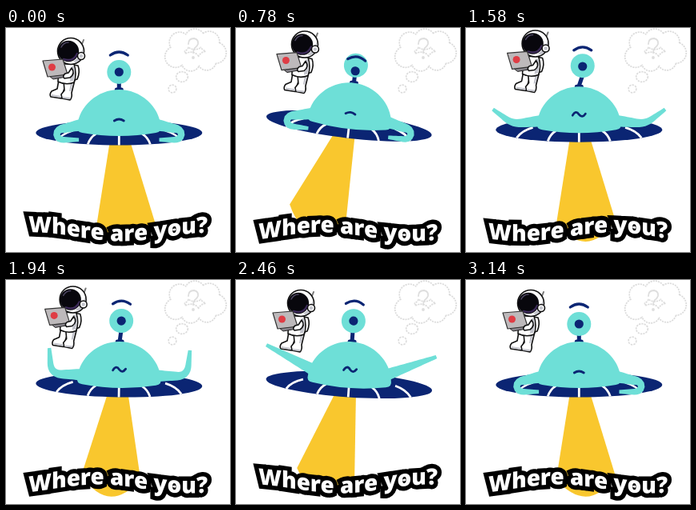
An HTML page that plays this animation: 280 by 280 pixels, repeating every 3180 ms.

```html
<!DOCTYPE html>
<html lang="en">
<head>
<meta charset="utf-8">
<title>Where are you?</title>
<style>
  html, body { margin: 0; width: 100%; height: 100%; overflow: hidden; background: #fff; }
  svg { display: block; width: 100vw; height: 100vh; }
  .teal { fill: #6edfd7; }
  .navy { fill: #0b2573; }
  .line { fill: none; stroke: #0b2573; stroke-linecap: round; stroke-linejoin: round; }
  .suit { fill: #fff; stroke: #111; stroke-width: 1.6; stroke-linejoin: round; }
  .shade { fill: #c3c4cc; }
  text {
    font-family: "Open Sans", "Noto Sans", sans-serif;
    font-weight: 800; font-stretch: 75%; fill: #fff;
  }
  #line { visibility: hidden; }
  #outline text { text-anchor: middle; fill: #000; stroke: #000; stroke-width: 11; stroke-linejoin: miter; stroke-miterlimit: 2; }
  #letters text { text-anchor: middle; }
</style>
</head>
<body>
<svg viewBox="0 0 280 280">
  <defs>
    <g id="puffs">
      <circle cx="212" cy="36" r="12.5"/><circle cx="217" cy="18" r="12"/>
      <circle cx="236" cy="14" r="12"/><circle cx="254" cy="17" r="12"/>
      <circle cx="262" cy="31" r="12.5"/><circle cx="251" cy="41" r="11"/>
      <circle cx="231" cy="42" r="11"/>
      <ellipse cx="220" cy="61" rx="6.5" ry="5.5"/><circle cx="208" cy="76" r="4"/>
    </g>
  </defs>

  <!-- thought bubble -->
  <use href="#puffs" fill="#fff" stroke="#dcdcdc" stroke-width="3.4" stroke-dasharray="2 1"/>
  <use href="#puffs" fill="#fff"/>
  <g fill="none" stroke="#dedede" stroke-width="1.8" stroke-linecap="round">
    <path d="M228 20Q228 13 235 13Q241 14 240 20Q239 23 236 25Q234 27 234 31"/>
    <circle cx="234" cy="37" r="1"/>
  </g>

  <!-- astronaut -->
  <g id="astro">
    <path class="suit" d="M86 43L92 44Q95 52 91 61L84 63Z"/>
    <path class="suit" d="M68 62L66 73L59 76Q56 80 58 83L71 85L77 66Z"/>
    <path class="suit" d="M74 63L75 75L71 80L72 85L82 87Q85 84 84 78L88 62Z"/>
    <path class="shade" d="M59 80l12 2v2l-12-2ZM73 83l10 1l-1 2l-9-1ZM83 65l3 0l-3 11h-2Z"/>
    <path class="suit" d="M68 42H87Q91 55 87 65Q77 69 67 64Z"/>
    <path class="shade" d="M84 45h3q2 10 -1 18l-4 1Z"/>
    <path d="M97 17L99 12" stroke="#777" stroke-width="2" stroke-linecap="round"/>
    <circle class="suit" cx="83" cy="26" r="16.5"/>
    <path class="shade" d="M90 40Q100 35 98 23Q95 33 86 39Z"/>
    <circle cx="80" cy="26" r="13.2" fill="#08070d"/>
    <path d="M74 36Q86 40 91 29" fill="none" stroke="#3c2a58" stroke-width="2.4" stroke-linecap="round"/>
    <path d="M71 21Q74 15 80 15" fill="none" stroke="#4b4560" stroke-width="1.5" stroke-linecap="round"/>
    <circle class="suit" cx="96" cy="32" r="4.5"/>
    <circle class="shade" cx="96" cy="32" r="2.2"/>
    <path d="M56 57L79 55L83 57L61 61Z" fill="#89868d" stroke="#222"/>
    <path d="M48 38L73 36L79 55L54 58Z" fill="#bdb9bb" stroke="#333" stroke-width="1.2" stroke-linejoin="round"/>
    <circle cx="59.5" cy="46" r="4.5" fill="#df3d45"/>
    <path class="suit" d="M84 47Q89 54 82 59L75 60Q72 57 76 54L80 53Z"/>
  </g>

  <path id="beam" class="beam" fill="#f9c72e" d="M-12.5 0H12.5L37 106Q0 154 -37 106Z"/>

  <!-- ship -->
  <g id="ship">
    <ellipse class="navy" rx="104" ry="15.5"/>
    <path id="ribs" stroke="#fff" stroke-width="2.8" fill="none"/>
    <path class="teal" id="left"/>
    <path class="teal" id="right" transform="scale(-1 1)"/>
    <path class="line" id="stalk" stroke-width="5"/>
    <path class="teal" d="M-52 -9C-50 -33 -27 -54 0 -54S50 -33 52 -9Q54 -1 46 0Q0 8 -46 0Q-54 -1 -52 -9Z"/>
    <path class="line" id="mouth" stroke-width="2.8"/>
    <g id="eye">
      <circle class="teal" r="15"/>
      <circle class="navy" id="iris" r="5.6"/>
      <path class="line" id="brow" d="M-11 3Q0 -5 11 3" stroke-width="3.2"/>
    </g>
  </g>

  <text id="line">Where are you?</text>
  <g id="outline"></g>
  <g id="letters"></g>
</svg>
<script>
const $ = id => document.getElementById(id);
const LOOP = 3180, STEP = 40, TAU = 2 * Math.PI;

const mix = (a, b, u) => a + (b - a) * u;
const move = (el, x, y, extra = '') => el.setAttribute('transform', `translate(${x} ${y}) ${extra}`);
const path = (id, d) => $(id).setAttribute('d', d);

// Smooth rise from 0 to 1, and a rise followed by a fall
function ramp(t, from, to) {
  const u = Math.min(1, Math.max(0, (t - from) / (to - from)));
  return u * u * (3 - 2 * u);
}
const bump = (t, from, peak, to) => ramp(t, from, peak) - ramp(t, peak, to);

path('ribs', [-2, -1, 0, 1, 2].map(i => {
  const x = i * 39, y = 15.5 * Math.sqrt(1 - (x / 104) ** 2);
  return `M${x * .74} ${y - 13}Q${x * .92} ${y - 9} ${x} ${y}`;
}).join(''));

// A tapering arm that leaves the dome at one angle and bends at its elbow
function armPath(angle, curl) {
  const n = 24, length = 75, over = [], under = [];
  let x = -38, y = -12;
  for (let i = 0; i <= n; i++) {
    const u = i / n, a = (angle + curl * ramp(u, .4, .75)) * Math.PI / 180;
    const half = mix(8, 2.2, u), dx = -Math.cos(a), dy = -Math.sin(a);
    over.push(`${x - dy * half} ${y + dx * half}`);
    under.unshift(`${x + dy * half} ${y - dx * half}`);
    x += dx * length / n;
    y += dy * length / n;
  }
  return `M${over.join('L')}L${under.join('L')}Z`;
}

// Lay the line out once, then give every letter its own element
function setLetters() {
  const line = $('line'), width = 224, size = 35;
  line.style.fontSize = size + 'px';
  const fit = size * Math.min(1, width / line.getComputedTextLength());
  line.style.fontSize = fit + 'px';
  const chars = [...line.textContent];
  const gap = (width - line.getComputedTextLength()) / (chars.length - 1);
  return chars.map((char, i) => {
    const x = 28 + i * gap + (line.getStartPositionOfChar(i).x + line.getEndPositionOfChar(i).x) / 2;
    const els = ['outline', 'letters'].map(id => {
      const el = document.createElementNS(line.namespaceURI, 'text');
      el.textContent = char;
      el.style.fontSize = fit + 'px';
      return $(id).appendChild(el);
    });
    return { x, els };
  });
}
const letters = setLetters();

function drawShip(t) {
  const tilt = 6.5 * bump(t, 0, 780, 1220) + 4 * bump(t, 1700, 2460, 3140);
  const x = 141.3, y = 131 - 10.5 * bump(t, 0, 1060, 1940);
  move($('ship'), x, y, `rotate(${tilt})`);

  const swing = 9 * Math.sqrt(tilt);
  move($('beam'), x + 1 - swing / 4, y + 10, `rotate(${swing - 4})`);

  const worry = ramp(t, 780, 1220) - ramp(t, 2500, 3100);
  const look = bump(t, 0, 780, 1800);
  const glance = -4 * bump(t, 0, 300, 700);
  const ex = 6 * bump(t, 780, 1220, 2300), ey = -76 - 4 * worry;
  path('stalk', `M${ex} ${ey + 12}L0 -55M-3 -54H3`);
  move($('eye'), ex, ey);
  move($('iris'), glance, 7 * look);
  move($('brow'), glance, -24 + 14 * look);

  const w = mix(6, 8, worry);
  path('mouth', `M${-w} 1Q${-w / 2} ${mix(-1, -6, worry)} 0 ${mix(-1, 0, worry)}Q${w / 2} ${mix(-1, 5, worry)} ${w} ${mix(1, -1, worry)}`);
  move($('mouth'), 0, -16 - 3 * worry);

  const angle = -12 + 12 * ramp(t, 1220, 1940) + 24 * ramp(t, 1940, 2460) - 36 * ramp(t, 2460, 3140);
  const droop = 1 - ramp(t, 780, 1220) + ramp(t, 2460, 3140);
  const arm = armPath(angle, 85 * bump(t, 1220, 1940, 2460) - 168 * droop);
  path('left', arm);
  path('right', arm);
}

function drawAstronaut(t) {
  const rise = bump(t, 0, 1220, 2460);
  move($('astro'), -2 + 7 * rise, 3 - 12 * rise);
}

// One wave as long as the line travels to the left
function drawText(frame) {
  const length = 225, height = 5.5;
  for (const { x, els } of letters) {
    const a = TAU * ((x - 145) / length + frame / 30);
    const slope = Math.atan(-height * TAU / length * Math.sin(a)) * 360 / TAU;
    for (const el of els) move(el, x, 261 + height * Math.cos(a), `skewY(${slope})`);
  }
}

const start = performance.now();
function tick() {
  const now = (performance.now() - start) % LOOP;
  const frame = Math.floor((now + STEP / 2) / STEP);
  const t = Math.max(0, frame * STEP - STEP / 2);
  drawShip(t);
  drawAstronaut(t);
  drawText(frame);
  requestAnimationFrame(tick);
}
tick();
</script>
</body>
</html>
```
